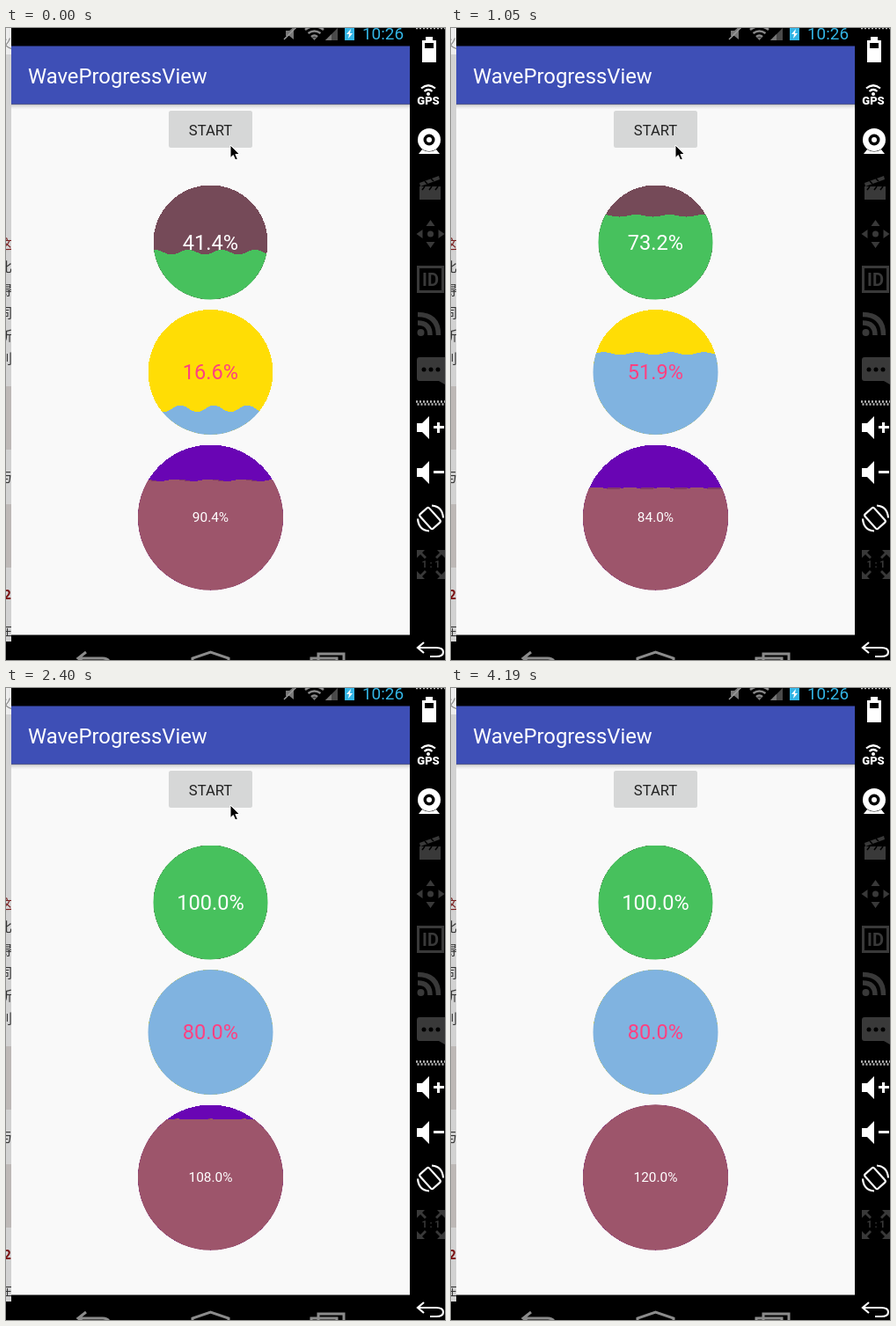
Write an HTML page that moves like this. It is 499 by 718 pixels and loops after 4.74 s.

```html
<!DOCTYPE html>
<html lang="en">
<head>
<meta charset="utf-8">
<title>Wave progress</title>
<style>
  html, body { margin: 0; width: 100%; height: 100%; overflow: hidden; background: #000; }
  svg { display: block; width: 499px; height: 718px; font-family: Roboto, sans-serif; }
  .line { fill: none; stroke: #fff; stroke-width: 2.2; }
  .dim { fill: #393939; }
  .dimline { fill: none; stroke: #393939; stroke-width: 3; }
  .thick { stroke-width: 5.5; }
  .nav { fill: none; stroke: #8b8b8b; stroke-width: 3; }
  .page { font: 15px "Noto Sans CJK SC", "Noto Sans CJK", sans-serif; text-anchor: end; fill: #333; }
  #waves circle, #waves path { shape-rendering: crispEdges; }
</style>
</head>
<body>
<svg viewBox="0 0 499 718">
  <defs>
    <linearGradient id="shade" x2="0" y2="1">
      <stop stop-color="#c2c2c2"/><stop offset=".5" stop-color="#e6e6e6"/><stop offset="1" stop-color="#f9f9f9"/>
    </linearGradient>
    <clipPath id="strip"><path d="M0 0h6v718h-6z"/></clipPath>
  </defs>
  <path d="M0 0h499v718H0z"/>

  <!-- page behind the window -->
  <g clip-path="url(#strip)" class="page">
    <path fill="#d2d2d2" d="M0 0h6v697H0z"/>
    <path fill="#ededed" d="M0 0h6v30H0z"/>
    <path fill="#bdb8b6" d="M0 407h6v72H0zM0 541h6v72H0z"/>
    <text x="7" y="23" fill="#888">义</text>
    <text x="7" y="251" fill="#7a1f1f">这</text>
    <text x="7" y="277">比</text><text x="7" y="303">得</text>
    <text x="7" y="329">同</text><text x="7" y="355">所</text>
    <text x="7" y="381">利</text><text x="7" y="515">与</text>
    <text x="6" y="649" fill="#7a1010" font-weight="700">2</text>
    <text x="7" y="690">在</text>
  </g>

  <!-- app window -->
  <path fill="#f9f9f9" d="M6 87h453v602.500H6z"/>
  <path fill="url(#shade)" d="M6 86.500h453v6H6z"/>
  <path fill="#3e4fb6" d="M6 20.500h453v66H6z"/>
  <text x="25" y="62.500" font-size="23.800" fill="#fff">WaveProgressView</text>
  <rect x="185" y="94" width="95" height="42" rx="2.500" fill="#d6d7d7"/>
  <text x="232.500" y="121.500" font-size="16.600" text-anchor="middle" fill="#222">START</text>

  <!-- status bar -->
  <g fill="#777">
    <path d="M318 3h4l5-4v14l-5-4h-4z"/>
    <path stroke="#999" stroke-width="1.500" d="M316 13L330 -1"/>
    <path fill="none" stroke="#888" stroke-width="2.500" d="M340 2q10.500-8 21 0M343.500 6q7-5 14 0M347 10q3.500-3 7 0"/>
    <path d="M350.500 14l-3-3.500h6z"/>
    <path d="M377 14V0L363 14z" fill="#4a4a4a"/>
    <path d="M370 14V7L363 14z"/>
  </g>
  <path fill="#33b5e5" d="M385 0h11v14h-11z"/>
  <path fill="#fff" d="M392 1l-5 6h3l-1 5 5-6h-3z"/>
  <text x="405" y="13" font-size="18.900" fill="#33b5e5">10:26</text>

  <!-- navigation bar -->
  <path class="nav" d="M91 709l-9 7 9 7M83 716h27q8 0 8 8M212 720v-4l20.500-7 20.500 7v4M355 718v-7h29v8M347 722v-6h29v6"/>

  <!-- emulator tool column -->
  <path stroke="#bbb" stroke-width="2.500" stroke-dasharray="2 2" d="M466 0h33M466 424.500h33M467.500 427.500h33"/>
  <g fill="#fff">
    <path d="M477 10h8v4h4v25h-16V14h4z"/>
    <path fill="#000" d="M476 17h10v6h-10z"/>
    <text x="480" y="87" font-size="13" font-weight="900" text-anchor="middle">GPS</text>
    <circle cx="480" cy="75" r="2"/>
    <path class="line" d="M475.500 72q4.500-4 9 0M472 68.500q8-6.500 16 0"/>
    <circle cx="481" cy="127" r="13"/>
    <circle cx="481" cy="127" r="6.500" fill="#000"/>
    <circle cx="481" cy="127" r="3"/>
    <path d="M473 138l-4 5h24l-4-5q-8 5-16 0z"/>
    <path id="speaker" d="M467 449h6l8-8v26l-8-8h-6z"/>
    <use href="#speaker" y="51"/>
    <path d="M486 452h4v-4h3v4h5v3h-5v5h-3v-5h-4zM486 503h12v3h-12z"/>
    <rect class="line" x="475" y="546" width="14" height="22" rx="2" transform="rotate(-42 482 557)"/>
    <path class="line" d="M484 542.500q12 1 13 14M481 571.500q-12-1-13-14"/>
    <path class="line" d="M475 698l-7 6 7 6M469 704h20q8 0 8 5t-8 5h-7"/>
  </g>
  <g class="dim">
    <path d="M470 180h24v15h-24zM470 176l22-8 1 4-22 8z"/>
    <path stroke="#000" stroke-width="1.500" d="M476 174l3 3M483 171l3 3M476 180l-3 4M484 180l-3 4M491 180l-3 4"/>
    <circle cx="482.500" cy="234" r="3.500"/>
    <path d="M482.500 218l5 7h-10zM482.500 250l5-7h-10zM466.500 234l7-5v10zM498.500 234l-7-5v10z"/>
    <rect class="dimline" x="468.500" y="271.500" width="28" height="28"/>
    <text x="482.500" y="293" font-size="20" font-weight="700" text-anchor="middle">ID</text>
    <circle cx="471.500" cy="346" r="4"/>
    <path class="dimline thick" d="M468 335q14 0 14 14M468 325.500q23.500 0 23.500 23.500"/>
    <path d="M470 374h29v31l-7-4h-22q-3 0-3-3v-21q0-3 3-3z"/>
    <g fill="#000"><circle cx="475" cy="388" r="2.500"/><circle cx="483" cy="388" r="2.500"/><circle cx="491" cy="388" r="2.500"/></g>
    <path d="M467 593h9l-3 3 5 5-2 2-5-5-4 4zM499 593h-9l3 3-5 5 2 2 5-5 4 4zM467 626h9l-3-3 5-5-2-2-5 5-4-4zM499 626h-9l3-3-5-5 2-2 5 5 4-4z"/>
    <text x="483" y="613" font-size="11" font-weight="700" text-anchor="middle">1 : 1</text>
  </g>

  <g id="waves"></g>
  <path id="cursor" d="M0 0v14.500l3.300-3 2.400 5.500 2.600-1.200-2.400-5.300h4.600z" fill="#000" stroke="#fff"/>
</svg>
<script>
const LOOP = 4740, STEP = 150, LAST = 4190;
const LEAD = 1367;        // time the progress has already run when the loop starts
const PERIOD = 38, CREST = 9.4, TRAVEL = 6;

const linear = t => t;
const accelerate = t => t * t;
const bounce = t => {
  t *= 1.1226;
  const hop = (mid, base) => 8 * (t - mid) ** 2 + base;
  return t < 0.3535 ? hop(0, 0) : t < 0.7408 ? hop(0.54719, 0.7)
    : t < 0.9644 ? hop(0.8526, 0.9) : hop(1.0435, 0.95);
};

const balls = [
  { y: 243.5, r: 65, max: 100, time: 3300, ease: linear, back: '#754a58', water: '#47c15d', ink: '#fff', size: 23.6 },
  { y: 391, r: 71, max: 80, time: 3000, ease: accelerate, back: '#ffdd05', water: '#80b3e0', ink: '#ff4081', size: 23.6 },
  { y: 556, r: 82.5, max: 120, time: 5000, ease: bounce, back: '#6905b4', water: '#9d556b', rear: '#843a68', ink: '#fff', size: 15.4 },
];
const CX = 232.5;
const $ = id => document.getElementById(id);

$('waves').innerHTML = balls.map((b, i) => `
  <clipPath id="clip${i}"><circle cx="${CX}" cy="${b.y}" r="${b.r}"/></clipPath>
  <circle cx="${CX}" cy="${b.y}" r="${b.r}" fill="${b.back}"/>
  <g clip-path="url(#clip${i})">
    <path id="rear${i}" fill="${b.rear || 'none'}"/><path id="front${i}" fill="${b.water}"/>
  </g>
  <text id="label${i}" x="${CX}" y="${b.y + b.size * 0.355}" font-size="${b.size}"
    text-anchor="middle" fill="${b.ink}"></text>`).join('');

// dir 1 starts one diameter left of the ball and drifts left, -1 mirrors that
function wave({ y, r }, p, dir) {
  const rise = CREST * (1 - p), w = dir * PERIOD / 2;
  const start = CX - dir * (3 * r + PERIOD * (0.8 + TRAVEL * p));
  const period = `q${w / 2} ${rise} ${w} 0q${w / 2} ${-rise} ${w} 0`;
  return `M${start} ${y + r - 2 * r * p}${period.repeat(17)}V${y + r + 1}H${start}z`;
}

const trail = [[0, 255, 133], [2400, 255, 133], [2700, 258, 149], [2850, 258, 149],
  [3150, 258, 151], [3600, 479, 579], [4050, 486, 678], [LAST, 510, 690]];

function cursorAt(t) {
  const i = Math.max(1, trail.findIndex(k => k[0] >= t));
  const [t0, x0, y0] = trail[i - 1], [t1, x1, y1] = trail[i];
  const f = (t - t0) / (t1 - t0);
  return [x0 + (x1 - x0) * f, y0 + (y1 - y0) * f];
}

function draw(now) {
  const clock = now % LOOP;
  const t = clock >= LAST ? LAST : Math.floor(clock / STEP) * STEP;
  balls.forEach((b, i) => {
    const level = b.ease(Math.min(1, (t + LEAD) / b.time));
    $('front' + i).setAttribute('d', wave(b, level, 1));
    if (b.rear) $('rear' + i).setAttribute('d', wave(b, level, -1));
    $('label' + i).textContent = (level * b.max).toFixed(1) + '%';
  });
  $('cursor').setAttribute('transform', `translate(${cursorAt(t)})`);
}

const begin = performance.now();
(function tick() {
  draw(performance.now() - begin);
  requestAnimationFrame(tick);
})();
</script>
</body>
</html>
```
